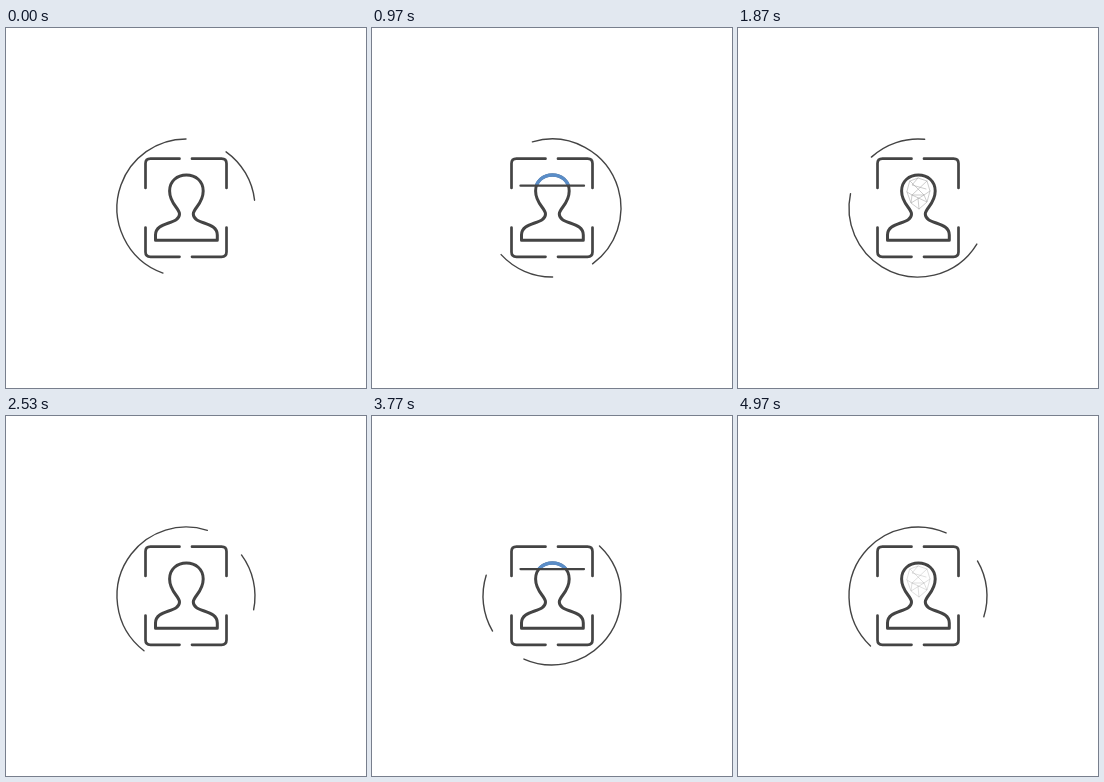
These frames come from a looping animation (360 by 360 pixels, 5000 ms). An HTML page with a canvas:

```html
<!DOCTYPE html>
<html lang="en">
<head>
<meta charset="utf-8">
<title>Face scan</title>
<style>
  html, body { margin: 0; height: 100%; overflow: hidden; background: #fff; }
  canvas { display: block; width: 360px; height: 360px; }
</style>
</head>
<body>
<canvas width="360" height="360"></canvas>
<script>
const ctx = document.querySelector('canvas').getContext('2d');
const INK = '#444', BLUE = '#5a8dc8';
const LOOP = 5000, SCAN = 73; // loop in ms, scan cycle in steps

const bust = new Path2D(
  'M149.5 212.3V207C149.5 193 173.5 197 173.5 186C173.5 180 163.6 176 163.6 163' +
  'C163.6 153 171.2 147 180.4 147C189.6 147 197.2 153 197.2 163' +
  'C197.2 176 187.3 180 187.3 186C187.3 197 211.3 193 211.3 207V212.3Z');
const brackets = new Path2D(
  'M139.5 160V135.5Q139.5 130.7 144.5 130.7H173.5M186 130.7H215.5Q220.5 130.7 220.5 135.5V160' +
  'M220.5 199.5V224Q220.5 228.8 215.5 228.8H186M173.5 228.8H144.5Q139.5 228.8 139.5 224V199.5');
const mesh = new Path2D(
  'M172 153L180 150L189 153L192 163L189 174L181 181L173 175L169 164Z' +
  'M172 153L186 167L192 163M189 153L174 167L169 164M180 150L174 157L188 161' +
  'M174 167L186 167L189 174L174 167L173 175L186 167M181 181L180 170');

const clamp = x => Math.min(1, Math.max(0, x));
const ramp = (x, a, b) => clamp((x - a) / (b - a));
const smooth = x => x * x * (3 - 2 * x);

function stroke(path, color, width, alpha = 1) {
  ctx.globalAlpha = alpha;
  ctx.strokeStyle = color;
  ctx.lineWidth = width;
  ctx.stroke(path);
  ctx.globalAlpha = 1;
}

function arc(from, to) {
  const path = new Path2D(), rad = Math.PI / 180;
  path.arc(180, 180, 69, from * rad, to * rad);
  stroke(path, INK, 1.4);
}

function scanLine(k, y) {
  const grow = smooth(ramp(k, 3, 9)), shrink = ramp(k, 43, 46);
  const left = 212 - 63.5 * grow, right = 212 - 63.5 * shrink;
  if (right - left < 0.5) return;
  const path = new Path2D();
  path.moveTo(left, y);
  path.lineTo(right, y);
  stroke(path, INK, 1 + 1.3 * ramp(k, 5, 10));
}

function draw(step) {
  const turn = step * 6, k = step % SCAN;
  const y = 140.3 + 40 * smooth(ramp(k, 6.6, 44.8));
  const tint = 1 - ramp(k, 43, 46);

  ctx.fillStyle = '#fff';
  ctx.fillRect(0, 0, 360, 360);
  ctx.lineCap = 'round';
  ctx.lineJoin = 'round';

  arc(turn + 109.5, turn + 270);
  arc(turn + 305.5, turn + 353.5);
  stroke(brackets, INK, 2.7);
  stroke(mesh, '#aaa', 0.6, ramp(k, 42, 46) * (1 - ramp(k, 48, 56)));
  stroke(bust, INK, 3);

  if (tint) {
    ctx.save();
    ctx.beginPath();
    ctx.rect(140, 140, 80, y - 140);
    ctx.clip();
    stroke(bust, BLUE, 3.4, tint);
    ctx.restore();
  }
  scanLine(k, y);
}

// 25 steps per second shown on a 30 Hz clock with 10 ms ticks
function stepAt(ms) {
  const slot = Math.floor((Math.floor(ms / 10) * 10 + 4) * 0.03);
  return Math.ceil(slot * 5 / 6 - 0.5);
}

const start = performance.now();
function frame() {
  draw(stepAt((performance.now() - start) % LOOP));
  requestAnimationFrame(frame);
}
frame();
</script>
</body>
</html>
```
